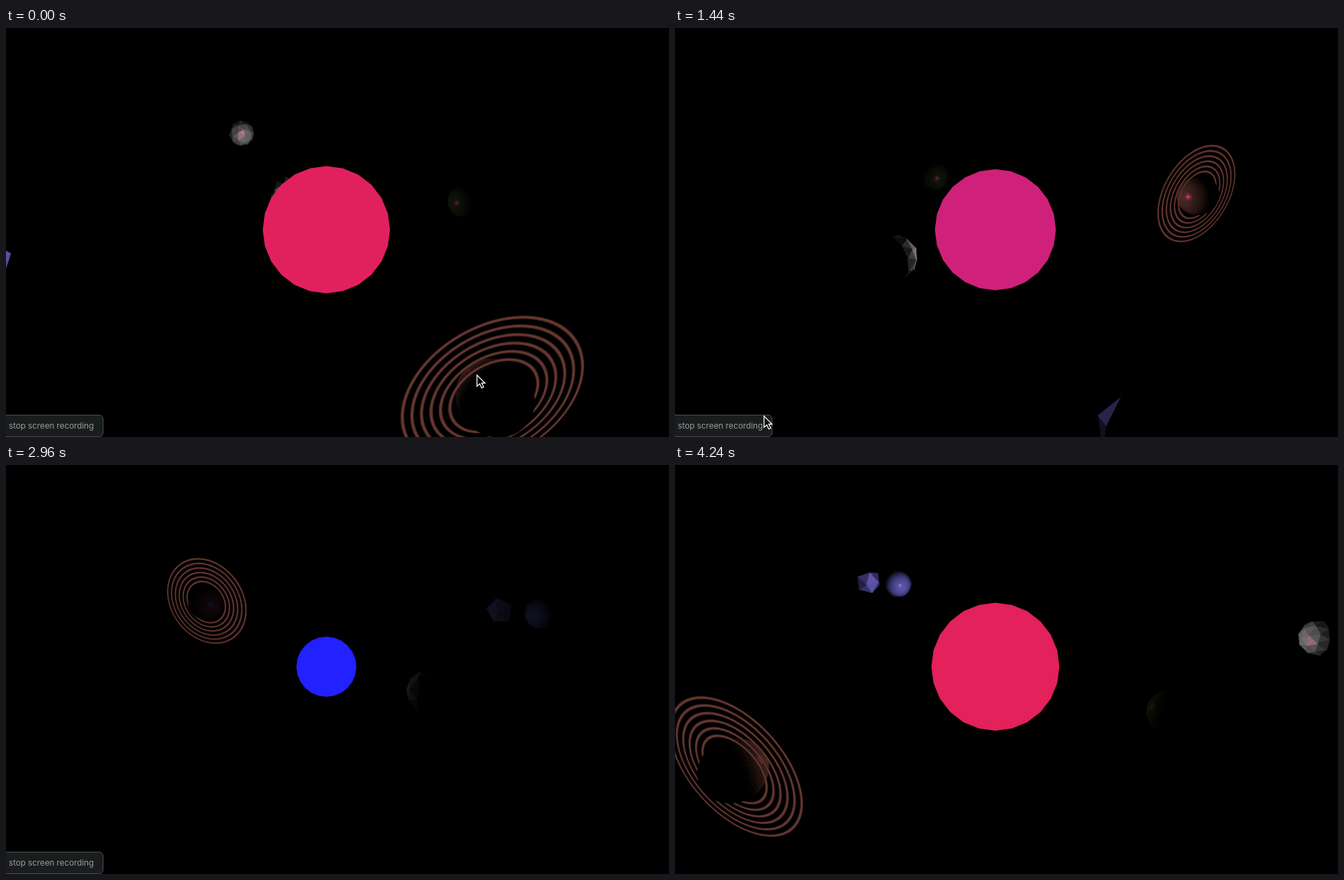
An HTML page with a canvas that plays this animation: 953x588 px, repeating every 4320 ms.

```html
<!DOCTYPE html>
<html lang="en">
<head>
<meta charset="utf-8">
<title>Planets around a pulsing star</title>
<style>
  html, body { margin: 0; width: 100%; height: 100%; overflow: hidden; background: #000; }
  canvas, svg, #pill { position: absolute; left: 0; top: 0; }
  #pill {
    left: -60px; top: 556px; width: 198px; height: 30px;
    border: 1px solid #4b4e4e; border-radius: 6px; background: #1a1d1d;
    color: #9b9c9c; font: 11.8px/30px Inter, "Liberation Sans", sans-serif;
    white-space: nowrap;
  }
  #pill span { position: absolute; left: 63px; }
</style>
</head>
<body>
<canvas id="space" width="953" height="588"></canvas>
<div id="pill"><span>stop screen recording</span></div>
<svg id="cursor" width="953" height="588">
  <path d="M0 0V16L4 12.5L6.7 18.5L9.5 17.3L6.8 11.5H11.5Z" fill="#000" stroke="#fff" stroke-width="1.3"/>
</svg>
<script>
const ctx = document.getElementById('space').getContext('2d');
const pill = document.getElementById('pill');
const cursor = document.getElementById('cursor');
const arrow = cursor.firstElementChild;

const LOOP = 4320, STEP = 80, FOCAL = 746, CX = 460.5, CY = 290;
const rad = deg => deg * Math.PI / 180;
const SIN = Math.sin(rad(26.5)), COS = Math.cos(rad(26.5));
const CAMERA = [0, SIN, COS];

// vectors
const add = (a, b) => a.map((v, i) => v + b[i]);
const sub = (a, b) => a.map((v, i) => v - b[i]);
const mul = (a, k) => a.map(v => v * k);
const dot = (a, b) => a[0] * b[0] + a[1] * b[1] + a[2] * b[2];
const unit = a => mul(a, 1 / Math.hypot(...a));
const clamp = (v, lo, hi) => Math.min(hi, Math.max(lo, v));
const rgb = c => `rgb(${c.map(v => Math.round(clamp(v, 0, 255)))})`;

const depth = p => 1 - p[2] * COS - p[1] * SIN;
function project(p) {
  const k = FOCAL / depth(p);
  return [CX + k * p[0], CY - k * (p[1] * COS - p[2] * SIN)];
}

function polygon(points, fill, edge) {
  ctx.beginPath();
  points.forEach(p => ctx.lineTo(p[0], p[1]));
  ctx.closePath();
  ctx.fillStyle = fill;
  ctx.fill();
  if (edge) {
    ctx.strokeStyle = fill;
    ctx.lineWidth = edge;
    ctx.stroke();
  }
}

// icosahedron, optionally subdivided towards a sphere
function icosphere(level) {
  const g = (1 + Math.sqrt(5)) / 2, verts = [];
  for (const a of [-1, 1]) for (const b of [-g, g])
    verts.push([0, a, b], [a, b, 0], [b, 0, a]);
  const near = (p, q) => Math.abs(Math.hypot(...sub(p, q)) - 2) < 0.01;
  let faces = [];
  verts.forEach((p, i) => verts.forEach((q, j) => verts.forEach((r, k) => {
    if (i < j && j < k && near(p, q) && near(q, r) && near(p, r))
      faces.push([p, q, r].map(unit));
  })));
  while (level-- > 0) {
    faces = faces.flatMap(([p, q, r]) => {
      const a = unit(add(p, q)), b = unit(add(q, r)), c = unit(add(r, p));
      return [[p, a, c], [a, q, b], [c, b, r], [a, b, c]];
    });
  }
  return faces.map(pts => ({ pts, normal: unit(add(add(pts[0], pts[1]), pts[2])) }));
}

const ROCK = icosphere(0), BOULDER = icosphere(1), BALL = icosphere(3);

// angle is in degrees at 0.56 s, speed in degrees per second
const bodies = [
  { orbit: .205, angle: -142.2, speed: -78.9, size: .039, mesh: BOULDER, color: [155, 155, 155], gloss: 1, shine: 14, spin: 40 },
  { orbit: .33, angle: -50, speed: -76, size: .035, mesh: BALL, color: [17, 23, 10], gloss: .6, shine: 50 },
  { orbit: .481, angle: 42.2, speed: -71.7, size: .0435, mesh: BALL, color: [80, 46, 40], gloss: 1.1, shine: 60, rings: true },
  { orbit: .597, angle: 137, speed: -69.2, size: .037, mesh: BALL, color: [92, 88, 175], gloss: .7, shine: 110,
    moon: { orbit: .092, angle: 160.7, speed: -284, size: .036, mesh: ROCK, color: [92, 88, 175], gloss: .25, shine: 14, spin: -60 } },
  { orbit: .716, angle: -132.9, speed: -64.8, size: .039, mesh: BOULDER, color: [110, 110, 110], gloss: 1, shine: 30, spin: 30 }
];

function place(body, t) {
  const a = rad(body.angle + body.speed * (t - .56));
  return [body.orbit * Math.cos(a), 0, body.orbit * Math.sin(a)];
}

function turn([x, y, z], a) {
  const c = Math.cos(a), s = Math.sin(a);
  return [x * c + z * s, y, z * c - x * s];
}

function drawMesh(body, centre, t, sun) {
  const spin = body.spin ? rad(body.spin * t + 20) : 0;
  for (const face of body.mesh) {
    const n = turn(face.normal, spin);
    const pts = face.pts.map(p => add(centre, mul(turn(p, spin), body.size)));
    const mid = mul(add(add(pts[0], pts[1]), pts[2]), 1 / 3);
    const view = unit(sub(CAMERA, mid));
    if (dot(n, view) <= 0) continue;
    const light = unit(mul(mid, -1));
    const lit = Math.max(0, dot(n, light));
    const half = Math.max(0, dot(n, unit(add(light, view))));
    // highlights fade out at grazing light
    const spec = body.gloss * half ** (body.shine * 2) * lit ** 3 * sun.power;
    const color = body.color.map((v, i) => v * lit * sun.power + sun.color[i] * spec);
    polygon(pts.map(project), rgb(color), .7);
  }
}

function drawRings(centre, front) {
  const tilt = rad(60) * centre[0];
  const u = [Math.cos(tilt), 0, -Math.sin(tilt)];
  const view = sub(CAMERA, centre);
  const facing = Math.atan2(view[1], dot(u, view));
  const reach = front ? Math.PI / 2 : Math.PI;
  const arc = r => Array.from({ length: 73 }, (_, i) => {
    const a = facing + reach * (i / 36 - 1);
    return project(add(centre, [u[0] * r * Math.cos(a), r * Math.sin(a), u[2] * r * Math.cos(a)]));
  });
  for (let i = 0; i < 6; i++) {
    const r = .1128 * (1 - .102 * i);
    for (const [w, color] of [[.0044, '#381f1a'], [.0026, '#66382f']])
      polygon([...arc(r + w / 2), ...arc(r - w / 2).reverse()], color);
  }
}

function drawBody(body, centre, t, sun) {
  if (body.rings) drawRings(centre, false);
  drawMesh(body, centre, t, sun);
  if (body.rings) drawRings(centre, true);
}

// the star swells and shrinks with a quadratic ease-out
function star(t) {
  const u = Math.abs(t < 2.725 ? t - .62 : t - 4.83);
  const radius = 97.4 - 15.5 * u * u;
  return {
    radius,
    power: clamp((radius - 31) / 61, .05, 1.05),
    color: [Math.max(34, 249 - 62 * u * u), 33, Math.min(255, 255 * Math.sqrt(.31 * u * u + .016))]
  };
}

function drawStar({ radius, color }) {
  const rim = Array.from({ length: 24 }, (_, i) => {
    const a = i * Math.PI / 12;
    return [CX + radius * Math.cos(a), CY + radius * Math.sin(a)];
  });
  polygon(rim, rgb(color));
}

// time, x, y of the pointer
const trail = [[0, 677, 499], [.56, 183, 526], [1.1, 112, 558], [1.44, 128, 558], [1.78, 74, 560], [2.08, 109, 559], [2.2, 109, 559]];

function movePointer(t) {
  const i = trail.findIndex(p => p[0] > t);
  cursor.style.visibility = i < 0 ? 'hidden' : 'visible';
  if (i < 0) return;
  const a = trail[i - 1], b = trail[i];
  const k = (t - a[0]) / (b[0] - a[0]);
  const [, x, y] = a.map((v, j) => v + (b[j] - v) * k);
  arrow.setAttribute('transform', `translate(${x} ${y})`);
}

function draw(t) {
  ctx.fillStyle = '#000';
  ctx.fillRect(0, 0, 953, 588);
  const sun = star(t);
  // the orbits run slower at the very start
  const orbitTime = t < .56 ? .56 - (.56 - t) * .59 : t;
  const scene = [{ at: [0, 0, 0], paint: () => drawStar(sun) }];
  const put = (body, at) => scene.push({ at, paint: () => drawBody(body, at, orbitTime, sun) });
  for (const body of bodies) {
    const at = place(body, orbitTime);
    put(body, at);
    if (body.moon) put(body.moon, add(at, place(body.moon, orbitTime)));
  }
  scene.sort((a, b) => depth(b.at) - depth(a.at)).forEach(s => s.paint());
  movePointer(t);
  pill.style.visibility = t < 3.76 ? 'visible' : 'hidden';
}

let shown = -1;
function tick() {
  const step = Math.floor(performance.now() % LOOP / STEP);
  if (step !== shown) {
    shown = step;
    draw(step * STEP / 1000);
  }
  requestAnimationFrame(tick);
}
tick();
</script>
</body>
</html>
```
